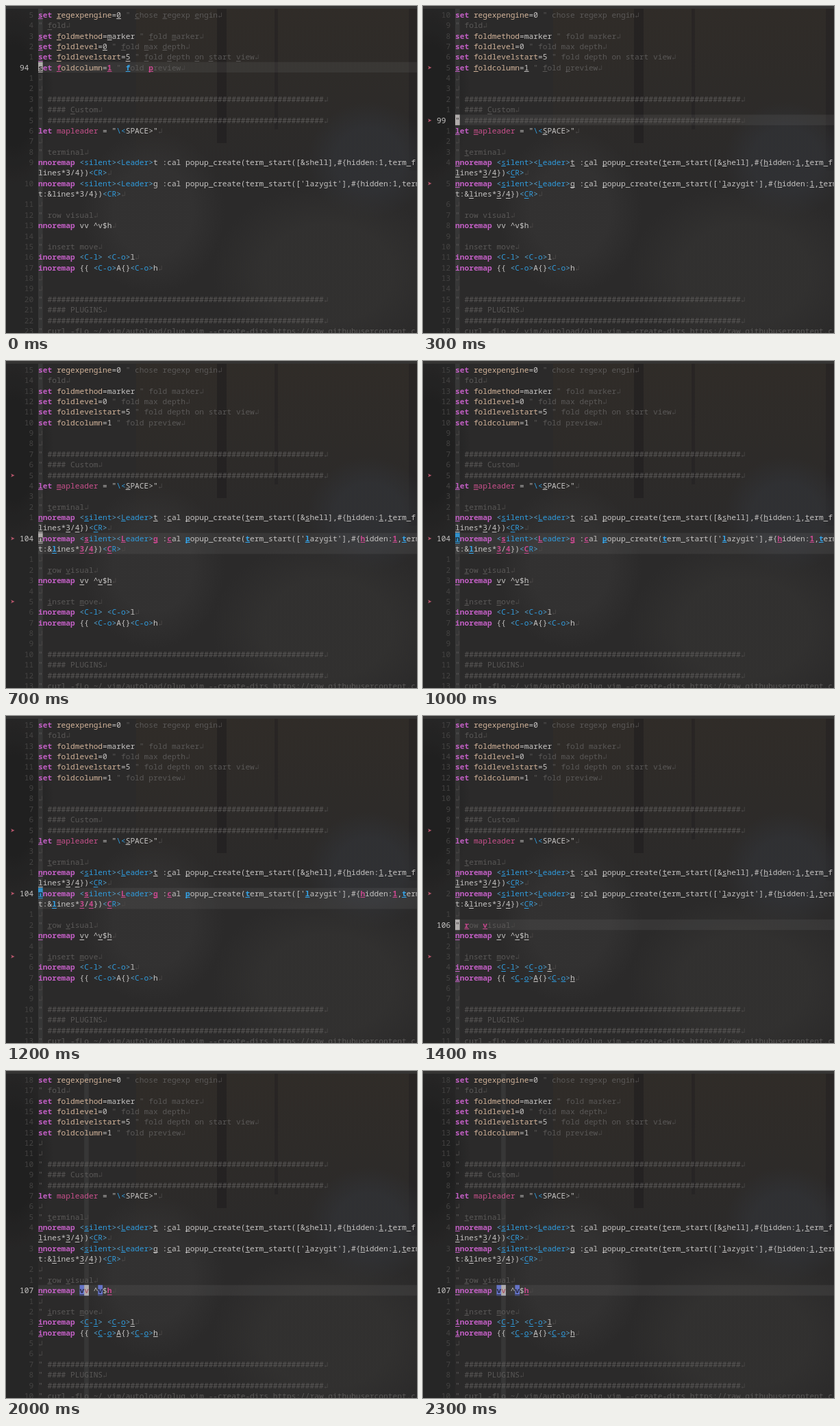
Animation of 600 by 477 pixels, one loop 2400 ms. Source, as an HTML page with a canvas:

```html
<!DOCTYPE html>
<html>
<head>
<meta charset="utf-8">
<style>
html, body { margin: 0; width: 100%; height: 100%; overflow: hidden; background: #2b2a2a; }
canvas { display: block; }
</style>
</head>
<body>
<canvas id="stage" width="600" height="477"></canvas>
<script>
const ctx = document.getElementById('stage').getContext('2d');
const CELL = 6.72, PITCH = 15.37, LEFT = 47, TOP = 4.8, LOOP = 2400;
const FONT = '11.2px "Noto Sans Mono", "DejaVu Sans Mono", monospace';
const INK = {
  plain: '#c6c4c3', key: '#c25fc4', option: '#d3b49a', name: '#c9508c', blue: '#2f9bdd',
  bracket: '#58a4cf', comment: '#5a5857', number: '#444342', eol: '#484645',
  first: '#c8488e', second: '#35a5ea', sign: '#b8566c'
};
const RULE = '" ' + '#'.repeat(60);
const ROWS = [
  'set regexpengine=0 " chose regexp engin',
  '" fold',
  'set foldmethod=marker " fold marker',
  'set foldlevel=0 " fold max depth',
  'set foldlevelstart=5 " fold depth on start view',
  'set foldcolumn=1 " fold preview',
  '', '',
  RULE, '" #### Custom', RULE,
  'let mapleader = "\\<SPACE>"',
  '',
  '" terminal',
  'nnoremap <silent><Leader>t :cal popup_create(term_start([&shell],#{hidden:1,term_f',
  'lines*3/4})<CR>',
  "nnoremap <silent><Leader>g :cal popup_create(term_start(['lazygit'],#{hidden:1,term",
  't:&lines*3/4})<CR>',
  '',
  '" row visual',
  'nnoremap vv ^v$h',
  '',
  '" insert move',
  'inoremap <C-l> <C-o>l',
  'inoremap {{ <C-o>A{}<C-o>h',
  '', '',
  RULE, '" #### PLUGINS', RULE,
  '" curl -fLo ~/.vim/autoload/plug.vim --create-dirs https://raw.githubusercontent.c'
];

// Two commands wrap onto a second screen row.
const isWrap = r => r === 15 || r === 17;
const lineOf = r => 89 + r - (r > 14) - (r > 16);

const STEPS = [
  { at: 0, line: 94, col: 0 },
  { at: 200, line: 99, col: 0, signs: 99 },
  { at: 500, line: 104, col: 0, signs: 104 },
  { at: 1000, line: 104, col: 0, signs: 104, blue: true },
  { at: 1300, line: 105, col: 0, signs: 104 },
  { at: 1400, line: 106, col: 0, signs: 104 },
  { at: 1500, line: 106, col: 2, signs: 104 },
  { at: 1600, line: 106, col: 6, signs: 104 },
  { at: 1700, line: 107, col: 6, signs: 104 },
  { at: 1800, line: 107, col: 9, signs: 104, find: 'v' },
  { at: 2000, line: 107, col: 10, find: 'v' }
];

function rect(x, y, w, h, color) {
  ctx.fillStyle = color;
  ctx.fillRect(x, y, w, h);
}

function put(text, x, y, color, bold) {
  ctx.font = (bold ? '600 ' : '') + FONT;
  ctx.fillStyle = color;
  ctx.fillText(text, x, y);
}

function glow(x, y, rx, ry, color) {
  ctx.save();
  ctx.translate(x, y);
  ctx.scale(rx, ry);
  const g = ctx.createRadialGradient(0, 0, 0.55, 0, 0, 1);
  g.addColorStop(0, `rgba(${color})`);
  g.addColorStop(1, `rgba(${color.replace(/[^,]+$/, '0')})`);
  ctx.fillStyle = g;
  ctx.fillRect(-1, -1, 2, 2);
  ctx.restore();
}

function backdrop() {
  rect(0, 0, 600, 477, '#2b2a2a');
  const g = ctx.createLinearGradient(0, 0, 0, 260);
  g.addColorStop(0, '#302c28');
  g.addColorStop(1, '#2b2a2a');
  rect(190, 0, 410, 260, g);
  rect(308, 0, 14, 200, 'rgba(30,29,30,.55)');
  rect(392, 0, 5, 180, 'rgba(30,29,30,.4)');
  rect(588, 0, 12, 240, 'rgba(30,29,30,.4)');
  glow(215, 300, 105, 120, '52,51,51,.8');
  glow(530, 225, 90, 85, '48,49,52,.9');
  glow(470, 390, 170, 130, '51,50,49,.8');
  glow(10, 130, 60, 130, '34,34,34,.9');
  rect(0, 0, LEFT, 477, 'rgba(25,25,25,.25)');
  rect(0, 0, 600, 4, '#353433');
}

function inkOf(text) {
  const ink = Array(text.length).fill('plain');
  const mark = (pattern, kind) => {
    for (const m of text.matchAll(pattern)) ink.fill(kind, m.index, m.index + m[0].length);
  };
  mark(/^(set|let|[ni]noremap)\b/g, 'key');
  mark(/(?<=^set )\w+/g, 'option');
  mark(/mapleader/g, 'name');
  mark(/\\</g, 'blue');
  mark(/<(silent|Leader|CR|C-.)>/g, 'bracket');
  mark(/(?<=<)(silent|Leader|CR|C-.)(?=>)/g, 'blue');
  mark(/^".*| " .*/g, 'comment');
  return ink;
}
const INKS = ROWS.map(inkOf);
const STARTS = ROWS.map((text, r) =>
  new Set([...text.matchAll(/\b\w/g)].map(m => m.index).filter(c => c || r !== 17)));

function drawRow(r, s) {
  const text = ROWS[r], line = lineOf(r), current = line === s.line;
  const top = TOP + r * PITCH, base = top + 12;
  const near = Math.abs(line - s.line) <= 5;
  const before = isWrap(r) ? ROWS[r - 1] : '';

  if (current) rect(LEFT, top, 553, PITCH, 'rgba(255,255,255,.055)');
  if (!isWrap(r)) {
    const num = String(current ? line : Math.abs(line - s.line));
    put(num, current ? 20 : 40.2 - num.length * CELL, base, current ? INK.plain : INK.number);
    if (s.signs && [-5, 0, 5].includes(line - s.signs)) put('➤', 6.5, base, INK.sign);
  }

  [...text].forEach((ch, c) => {
    const x = LEFT + c * CELL, kind = INKS[r][c];
    const start = near && STARTS[r].has(c);
    let color = INK[kind], bold = kind === 'key';
    if (start && current && c) {
      color = (before + text.slice(0, c)).includes(ch) ? INK.second : INK.first;
      bold = true;
    }
    if (current && ch === s.find) {
      rect(x, top, CELL, PITCH, '#6573c6');
      color = '#292b45';
    }
    if (current && c === s.col && !isWrap(r)) {
      rect(x, top, CELL, PITCH, s.blue ? '#2f91cc' : '#b0acab');
      color = s.blue ? '#252d33' : c ? '#a33f55' : '#3c383a';
    }
    put(ch, x, base, color, bold);
    if (start) rect(x, Math.round(base + 1.5), CELL, 1, color);
  });

  if (r !== 14 && r !== 16) put('↲', LEFT + text.length * CELL, base, INK.eol);
  if (current && !text) rect(LEFT, top, CELL, PITCH, '#b0acab');
}

function frame(now) {
  const t = now % LOOP;
  const s = STEPS.findLast(step => step.at <= t);
  backdrop();
  rect(LEFT + s.col * CELL, 4, CELL, 473, 'rgba(255,255,255,.06)');
  ROWS.forEach((_, r) => drawRow(r, s));
  requestAnimationFrame(frame);
}
frame(0);
</script>
</body>
</html>
```
